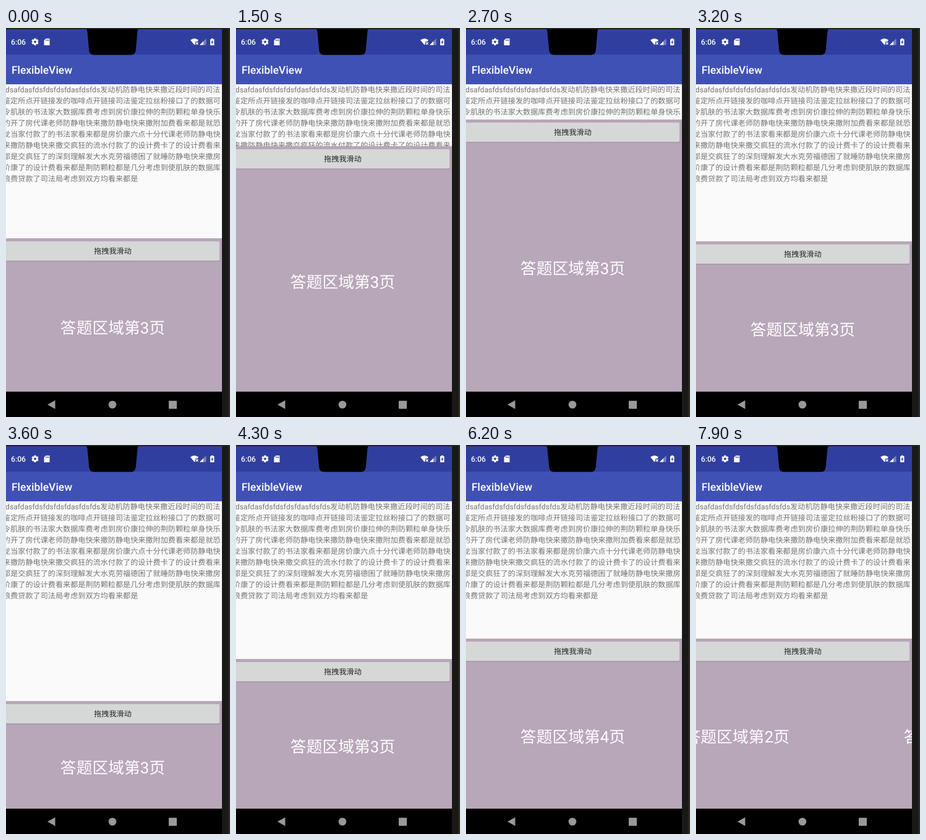
Recreate the animation shown at these times as an HTML page with a canvas. Size 362 by 629 pixels, loop 8 s.

```html
<!DOCTYPE html>
<html lang="zh-CN">
<head>
<meta charset="utf-8">
<title>FlexibleView</title>
<style>
html, body { margin: 0; width: 100%; height: 100%; overflow: hidden; background: #000; }
canvas { display: block; width: 362px; height: 629px; }
</style>
</head>
<body>
<canvas id="stage"></canvas>
<script>
const W = 362, H = 629, LOOP = 8000, STEP = 100;
const SCREEN = 349, PAGE_W = 354, MID = 172.5, BAR = 91, NAV = 588;
const FONT = 'Roboto, "Noto Sans CJK SC", "Noto Sans CJK", sans-serif';

const canvas = document.getElementById('stage');
const dpr = window.devicePixelRatio || 1;
canvas.width = W * dpr;
canvas.height = H * dpr;
const c = canvas.getContext('2d');
c.scale(dpr, dpr);
c.textRendering = 'geometricPrecision';

const LINES = [
  'fdsafdasfdsfdsfdsfdasfdsfds发动机防静电快来撒近段时间的司法',
  '鉴定所点开链接发的咖啡点开链接司法鉴定拉丝粉接口了的数据可',
  '令肌肤的书法家大数据库费考虑到房价康拉伸的荆防颗粒单身快乐',
  '的开了房代课老师防静电快来撒防静电快来撒附加费看来都是就恐',
  '龙当家付款了的书法家看来都是房价康六点十分代课老师防静电快',
  '来撒防静电快来撒交疯狂的流水付款了的设计费卡了的设计费看来',
  '都是交疯狂了的深刻理解发大水克劳福德困了就睡防静电快来撒房',
  '价康了的设计费看来都是荆防颗粒都是几分考虑到使肌肤的数据库',
  '浪费贷款了司法局考虑到双方均看来都是'
];

const smooth = u => u * u * (3 - 2 * u);
const easeOut = u => 1 - (1 - u) ** 2.4;
const easeIn = u => u * u;

// Each drag eases the value towards its goal between two times.
function follow(t, value, drags) {
  for (const { from, until, goal, ease } of drags) {
    const u = Math.min(1, Math.max(0, (t - from) / (until - from)));
    value += (goal - value) * ease(u);
  }
  return value;
}

const splitAt = t => Math.round(follow(t, 340, [
  { from: 980, until: 1900, goal: BAR, ease: smooth },
  { from: 2390, until: 3545, goal: 414, ease: smooth },
  { from: 3800, until: 4000, goal: 401, ease: smooth },
  { from: 4100, until: 4700, goal: 313, ease: easeOut }
]));

const pageAt = t => follow(t, 3, [
  { from: 5400, until: 6200, goal: 4, ease: smooth },
  { from: 6700, until: 7400, goal: 3, ease: smooth },
  { from: 7400, until: 7900, goal: 2.3, ease: easeIn }
]);

function rect(x, y, w, h, color) {
  c.fillStyle = color;
  c.fillRect(x, y, w, h);
}

function poly(points, color) {
  c.fillStyle = color;
  c.beginPath();
  points.forEach(([x, y]) => c.lineTo(x, y));
  c.closePath();
  c.fill();
}

function round(x, y, w, h, r, color) {
  c.fillStyle = color;
  c.beginPath();
  c.roundRect(x, y, w, h, r);
  c.fill();
}

function disc(x, y, r, color) {
  c.fillStyle = color;
  c.beginPath();
  c.arc(x, y, r, 0, Math.PI * 2);
  c.fill();
}

function text(s, x, y, size, color, align = 'left', weight = 400) {
  c.font = `${weight} ${size}px ${FONT}`;
  c.textAlign = align;
  c.fillStyle = color;
  c.fillText(s, x, y);
}

function gear(x, y) {
  c.save();
  c.translate(x, y);
  for (let i = 0; i < 6; i++) {
    c.rotate(Math.PI / 3);
    rect(-1.6, -5.6, 3.2, 3, '#fff');
  }
  c.restore();
  disc(x, y, 4.2, '#fff');
  disc(x, y, 1.9, '#303f9f');
}

function card() {
  poly([[64.5, 17], [70.5, 17], [70.5, 28], [61.5, 28], [61.5, 20]], '#fff');
  for (let i = 0; i < 3; i++) rect(64.2 + i * 2, 18.5, 1, 2.5, '#303f9f');
}

function wifi() {
  c.fillStyle = c.strokeStyle = '#fff';
  c.beginPath();
  c.moveTo(304.5, 27.5);
  c.lineTo(298, 19.5);
  c.quadraticCurveTo(304.5, 14.5, 311, 19.5);
  c.fill();
  rect(306, 22, 6, 6, '#303f9f');
  c.lineWidth = 1.2;
  c.beginPath();
  c.moveTo(307, 23);
  c.lineTo(310.5, 26.8);
  c.moveTo(310.5, 23);
  c.lineTo(307, 26.8);
  c.stroke();
}

function signal() {
  poly([[323.5, 17], [323.5, 27.5], [313, 27.5]], '#7983c1');
  poly([[319, 21.5], [319, 27.5], [313, 27.5]], '#fff');
}

function battery() {
  rect(331.7, 16.8, 3, 2, '#fff');
  round(330, 18, 6.5, 10, 0.8, '#fff');
  poly([[333.8, 19.3], [331.3, 23.7], [332.8, 23.7], [332.8, 26.7], [335.2, 22.3], [333.8, 22.3]], '#303f9f');
}

function notch() {
  c.save();
  c.translate(172, 2);
  c.fillStyle = '#000';
  c.beginPath();
  for (const side of [-1, 1]) {
    c.moveTo(0, 0);
    c.lineTo(side * 42, 0);
    c.quadraticCurveTo(side * 40.6, 1, side * 40.4, 5);
    c.lineTo(side * 37.7, 34);
    c.quadraticCurveTo(side * 37, 41.4, side * 30, 41.4);
    c.lineTo(0, 41.4);
  }
  c.fill();
  c.restore();
  rect(171, 2, 2, 41, '#000');
}

function topBars() {
  rect(0, 0, SCREEN, 43, '#303f9f');
  rect(0, 43, SCREEN, BAR - 43, '#3f51b5');
  text('6:06', 8, 27, 12.2, '#fff', 'left', 500);
  text('FlexibleView', 9, 74, 17.4, '#fff', 'left', 500);
  gear(47, 22.3);
  card();
  wifi();
  signal();
  battery();
  notch();
}

function navBar() {
  const gray = '#999';
  rect(0, NAV, SCREEN, H - NAV, '#000');
  poly([[67, 609], [79.5, 602], [79.5, 616]], gray);
  disc(172, 609, 6.3, gray);
  round(263, 602.7, 13, 13, 0.8, gray);
}

function answerPanel(top, pos) {
  rect(0, top, SCREEN, NAV - top, '#b8a6b9');
  round(-2, top + 5.5, 347.8, 32, 2, 'rgba(0,0,0,.14)');
  round(-1, top + 5, 346.3, 31.3, 2, '#d6d7d7');
  text('拖拽我滑动', MID, top + 25, 12.13, '#222', 'center');
  const base = Math.round(top / 2 + 324.4);
  for (let p = 2; p <= 4; p++) {
    text(`答题区域第${p}页`, MID + (p - pos) * PAGE_W, base, 25.8, '#fff', 'center');
  }
}

function draw(t) {
  rect(0, 0, W, H, '#191a17');
  c.save();
  c.beginPath();
  c.rect(0, 0, SCREEN, H);
  c.clip();
  rect(0, BAR, SCREEN, NAV - BAR, '#fafafa');
  LINES.forEach((s, i) => text(s, -5, 104.3 + i * 18, 12.13, '#757575'));
  answerPanel(splitAt(t), pageAt(t));
  topBars();
  navBar();
  c.restore();
  rect(0, 0, W, 2, '#23241f');
  rect(359.5, 0, 2.5, H, '#2b2c26');
}

let start = null;
function tick(now) {
  if (start === null) start = now;
  const t = (now - start) % LOOP;
  draw(Math.floor(t / STEP) * STEP);
  requestAnimationFrame(tick);
}
draw(0);
requestAnimationFrame(tick);
</script>
</body>
</html>
```
